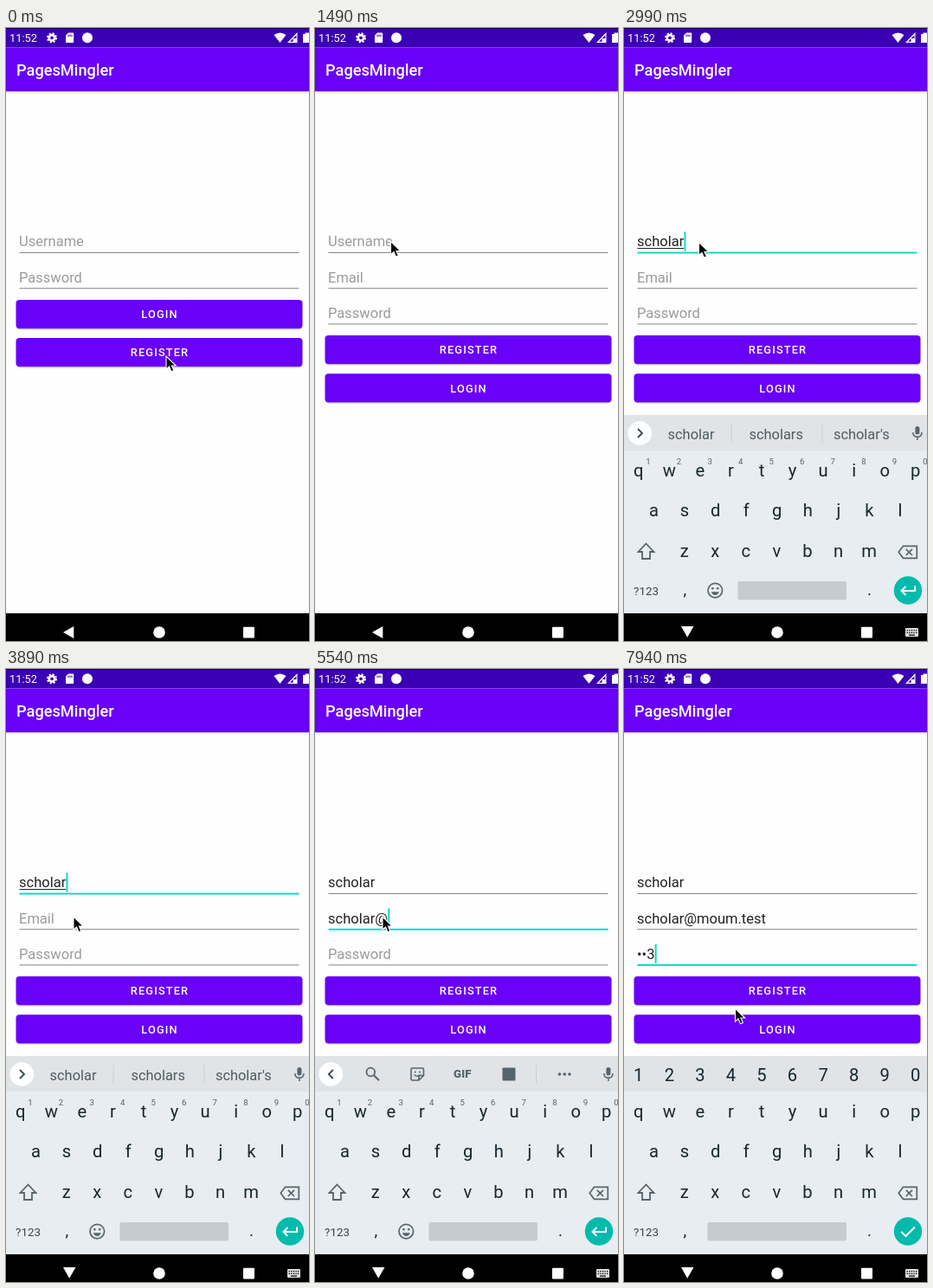
An HTML page for the animation above (8000 ms loop, 350 by 708 pixels).

```html
<!DOCTYPE html>
<html lang="en">
<head>
<meta charset="utf-8">
<title>Register form</title>
<style>
  html, body { margin: 0; width: 100%; height: 100%; overflow: hidden; background: #fefefe; }
  svg { display: block; width: 100vw; height: 100vh; font-family: Roboto, sans-serif; }
</style>
</head>
<body>
<svg id="stage" viewBox="0 0 350 708"></svg>
<script>
const LOOP = 8000;
const PURPLE = '#6900f8', TEAL = '#03dac5', KEY = '#15272f', ICON = '#56646c';
const USER = 'scholar', MAIL = 'scholar@moum.test', PASS = '123';
const FIELD_SIZE = 16.5;

const stage = document.getElementById('stage');
const pen = document.createElement('canvas').getContext('2d');
pen.font = `${FIELD_SIZE}px Roboto, sans-serif`;

// Each entry is [start time, value...]; values hold until the next entry.
const pointer = [
  [0, 185, 379], [150, 180, 376], [300, 174, 372], [450, 172, 371],
  [1190, 160, 345], [1340, 106, 270], [1490, 87.5, 246.5], [1640, 86.5, 247.5],
  [3590, 84, 262], [3740, 80, 279], [3890, 78, 286],
  [6890, 83.5, 303], [7040, 90, 327], [7190, 92, 336], [7940, 128.5, 392]
];
const userTyped = [[0, 0], [2240, 1], [2540, 2], [2690, 3], [2840, 5], [2990, 7]];
const mailTyped = [[0, 0], [4340, 1], [4490, 2], [4640, 3], [4790, 5], [4940, 6], [5090, 7],
  [5540, 8], [5840, 9], [5990, 10], [6140, 12], [6290, 13], [6440, 15], [6590, 17]];
const passTyped = [[0, 0], [7490, 1], [7640, 2], [7790, 3]];
const focusAt = [[0, -1], [1790, 0], [4040, 1], [7340, 2]];
const keyboardDrop = [[0, 229], [1790, 120], [1940, 28], [2090, 0]];

const at = (steps, t) => steps.filter(s => s[0] <= t).pop().slice(1);

const rect = (x, y, w, h, fill, r = 0) =>
  `<rect x="${x}" y="${y}" width="${w}" height="${h}" rx="${r}" fill="${fill}"/>`;
const disc = (x, y, r, fill) => `<circle cx="${x}" cy="${y}" r="${r}" fill="${fill}"/>`;
const shape = (d, fill) => `<path d="${d}" fill="${fill}"/>`;
const line = (d, color, w = 1.7) =>
  `<path d="${d}" fill="none" stroke="${color}" stroke-width="${w}"/>`;
const label = (s, x, y, size, fill, extra = '') =>
  `<text x="${x}" y="${y}" font-size="${size}" fill="${fill}" ${extra}>${s}</text>`;
const centered = (s, x, y, size, fill, extra = '') =>
  label(s, x, y, size, fill, `text-anchor="middle" ${extra}`);

function topBars() {
  return rect(0, 73, 350, 1, '#c9c4d4') + rect(0, 74, 350, 1.5, '#eeecf2') +
    rect(0, 0, 350, 22.5, '#3c00b4') + rect(0, 0, 350, 1, '#1d0058') +
    rect(0, 22.5, 350, 50.5, PURPLE) +
    label('11:52', 4, 16, 12.8, '#fff') +
    '<circle cx="53" cy="11.3" r="3.2" fill="none" stroke="#fff" stroke-width="2.6"/>' +
    '<circle cx="53" cy="11.3" r="5" fill="none" stroke="#fff" stroke-width="2" stroke-dasharray="2.1 1.83"/>' +
    shape('M72 5.5H77.2Q78.2 5.5 78.2 6.5V16Q78.2 17 77.2 17H70Q69 17 69 16V8.5Z', '#fff') +
    line('M72 7.5V10M74 7.5V10M76 7.5V10', '#3c00b4', 1) +
    disc(94, 11.2, 6, '#fff') +
    shape('M309.5 8Q316.5 2.8 323.5 8L316.5 17Z', '#fff') +
    shape('M336.5 5V17H325Z', '#fff') + shape('M335.4 8.2V12H331.6V15.8H328Z', '#3c00b4') +
    shape('M343 7H345.5V5.5H350V17H343Z', '#fff') +
    label('PagesMingler', 12, 55, 18.2, '#fff', 'font-weight="500"');
}

function button(text, y, fill = PURPLE) {
  return rect(12, y + 1.8, 330, 33, '#00000022', 4) + rect(12, y + .8, 330, 33, '#00000030', 4) +
    rect(11.5, y, 331, 33, fill, 4) +
    centered(text, 177.5, y + 21.2, 12.8, '#fff', 'font-weight="500" letter-spacing="1.14"');
}

function field(i, hint, text, focused, composing) {
  const y = 252.3 + 41.2 * i;
  const width = text ? pen.measureText(text).width : 0;
  let out = text ? label(text, 15, y, FIELD_SIZE, '#222') : label(hint, 15, y, FIELD_SIZE, '#9b9b9b');
  if (composing) out += rect(15.5, y + 1.7, width - .5, 1, '#222');
  out += focused ? rect(15.5, y + 6.3, 323, 1.9, TEAL) : rect(15.5, y + 6.7, 323, 1, '#868686');
  if (focused) out += rect(15.3 + width, y - 17, 1.9, 22.3, TEAL);
  return out;
}

function suggestions(word) {
  const n = word.length;
  if (n === 7) return [word, word + 's', word + "'s"];
  if (n > 3) return [word, USER, USER + 's'];
  return [word, ['so', 'scene', 'schwa'][n - 1], word[0].toUpperCase() + word.slice(1)];
}

const divider = x => rect(x, 457.5, 1, 21, '#c8cdd1');

function mic() {
  return rect(336.4, 460, 5, 9.5, ICON, 2.5) +
    line('M333.8 467Q334 472.3 338.9 472.3Q343.8 472.3 344 467M338.9 472V476', ICON, 1.5);
}

function toolbar() {
  return disc(18.3, 468, 13.8, '#fff') + line('M20.8 463L15.8 468L20.8 473', '#37474f', 1.8) +
    '<circle cx="64.3" cy="465.5" r="4.8" fill="none" stroke="#56646c" stroke-width="1.8"/>' +
    line('M67.8 469L74 475.2', ICON, 2) +
    line('M112.5 461H124Q125.5 461 125.5 462.5V469.5L120 475H112.5Q111 475 111 473.5V462.5Q111 461 112.5 461ZM125 469.5H120V475', ICON, 1.6) +
    disc(115.7, 465.5, 1, ICON) + disc(121, 465.5, 1, ICON) +
    line('M114.5 468.5Q117.8 472 121.5 468.5', ICON, 1.3) +
    centered('GIF', 170.3, 472.4, 13.3, ICON, 'font-weight="900"') +
    rect(216.5, 460.5, 15, 15, ICON, 1) + divider(255) +
    [282.5, 288.3, 294].map(x => disc(x, 468, 1.8, ICON)).join('') + mic();
}

function wordStrip(word) {
  const fix = word.length > 1 && word.length < 7;
  return disc(18.3, 468, 13.8, '#fff') + line('M16 463L21 468L16 473', '#37474f', 1.8) +
    divider(123.5) + divider(228.5) + mic() +
    suggestions(word).map((s, i) => {
      const bold = fix && i === 1;
      return centered(s, [77.5, 175.7, 274.3][i], 474.5, 16.4, bold ? '#000' : '#4d5a62',
        bold ? 'font-weight="700"' : '');
    }).join('');
}

function keyRow(letters, x, y) {
  return [...letters].map((c, i) => centered(c, x + 35.55 * i, y, 20.2, KEY)).join('');
}

function keyboard(word, secret) {
  let out = rect(0, 447, 350, 41, '#e0e4e7') + rect(0, 488, 350, 188, '#e8edf1') +
    keyRow('qwertyuiop', 16.8, 518) + keyRow('asdfghjkl', 34.5, 564.3) + keyRow('zxcvbnm', 69.8, 610.7);
  if (secret) {
    out += keyRow('1234567890', 16.8, 476);
  } else {
    out += word ? wordStrip(word) : toolbar();
    out += [...'1234567890'].map((c, i) => centered(c, 28 + 35.55 * i, 504, 9.6, '#55636b')).join('');
    out += '<circle cx="105.3" cy="649.6" r="8.3" fill="none" stroke="#56646c" stroke-width="1.7"/>' +
      disc(102.4, 647.3, 1.3, ICON) + disc(108.2, 647.3, 1.3, ICON) +
      shape('M100.7 651.3H109.9Q108.5 655 105.3 655T100.7 651.3Z', ICON);
  }
  const left = secret ? 96.5 : 131.5;
  out += line('M25.5 595.5L34.5 605H30V613H21V605H16.5Z', ICON, 1.8) +
    line('M322.5 598.3H338.3V612.3H322.5L317.3 605.3ZM325.8 601.8L333 609M333 601.8L325.8 609', ICON, 1.7) +
    centered('?123', 25.5, 654.5, 13.4, '#35454d') +
    centered(',', 70.3, 655, 19, KEY) + centered('.', 283.5, 655, 19, KEY) +
    rect(left, 639, 257 - left, 21.5, '#c6cbcf', 2) + disc(328, 649.5, 16.2, '#02bbac');
  out += secret
    ? line('M320.3 650L325.5 655L336 644.5', '#fff', 2)
    : line('M336 644.5V650H320.5M325.5 645L320.5 650L325.5 655', '#fff', 2);
  return out;
}

function navBar(open) {
  let out = rect(0, 676, 350, 32, '#000') + disc(177, 698, 6.8, '#fff') + rect(274, 691.8, 13, 12.6, '#fff', 1);
  if (!open) return out + shape('M66 698L78.3 691V705Z', '#fff');
  out += shape('M66 691H80.5L73.2 703.7Z', '#fff') + rect(325, 693, 15, 10, '#ddd', 1);
  for (let i = 0; i < 5; i++) out += rect(326.6 + 2.6 * i, 695, 1.3, 1.3, '#000') + rect(326.6 + 2.6 * i, 697.7, 1.3, 1.3, '#000');
  return out + rect(329, 700.5, 7, 1.2, '#000');
}

function arrow([x, y]) {
  return `<path transform="translate(${x} ${y})" d="M0 0V15.2L3.5 12L6 17.8L8.9 16.5L6.4 11H11.2Z"
    fill="#000" stroke="#fff" stroke-width="1.1"/>`;
}

function scene(t) {
  let out = rect(0, 0, 350, 708, '#fefefe') + topBars();
  if (t < 1340) {
    out += field(0, 'Username') + field(1, 'Password') +
      button('LOGIN', 314) + button('REGISTER', 358, t < 1190 ? PURPLE : '#7d2bfa');
    return out + navBar(false) + arrow(at(pointer, t));
  }
  const [focus] = at(focusAt, t), [drop] = at(keyboardDrop, t);
  const user = USER.slice(0, at(userTyped, t)[0]);
  const mail = MAIL.slice(0, at(mailTyped, t)[0]);
  const n = at(passTyped, t)[0];
  const pass = n ? '•'.repeat(n - 1) + PASS[n - 1] : '';
  const word = focus === 0 ? user : focus === 1 && !mail.includes('@') ? mail : '';
  out += field(0, 'Username', user, focus === 0, focus === 0 && word) +
    field(1, 'Email', mail, focus === 1, focus === 1 && word) +
    field(2, 'Password', pass, focus === 2) +
    button('REGISTER', 355) + button('LOGIN', 399.3);
  if (focus >= 0) {
    out += `<g transform="translate(0 ${drop})" opacity="${1 - drop / 240}">${keyboard(word, focus === 2)}</g>`;
  }
  return out + navBar(focus >= 0) + arrow(at(pointer, t));
}

let shown = '';
function tick(now) {
  const next = scene(now % LOOP);
  if (next !== shown) stage.innerHTML = shown = next;
  requestAnimationFrame(tick);
}
tick(performance.now());
</script>
</body>
</html>
```
